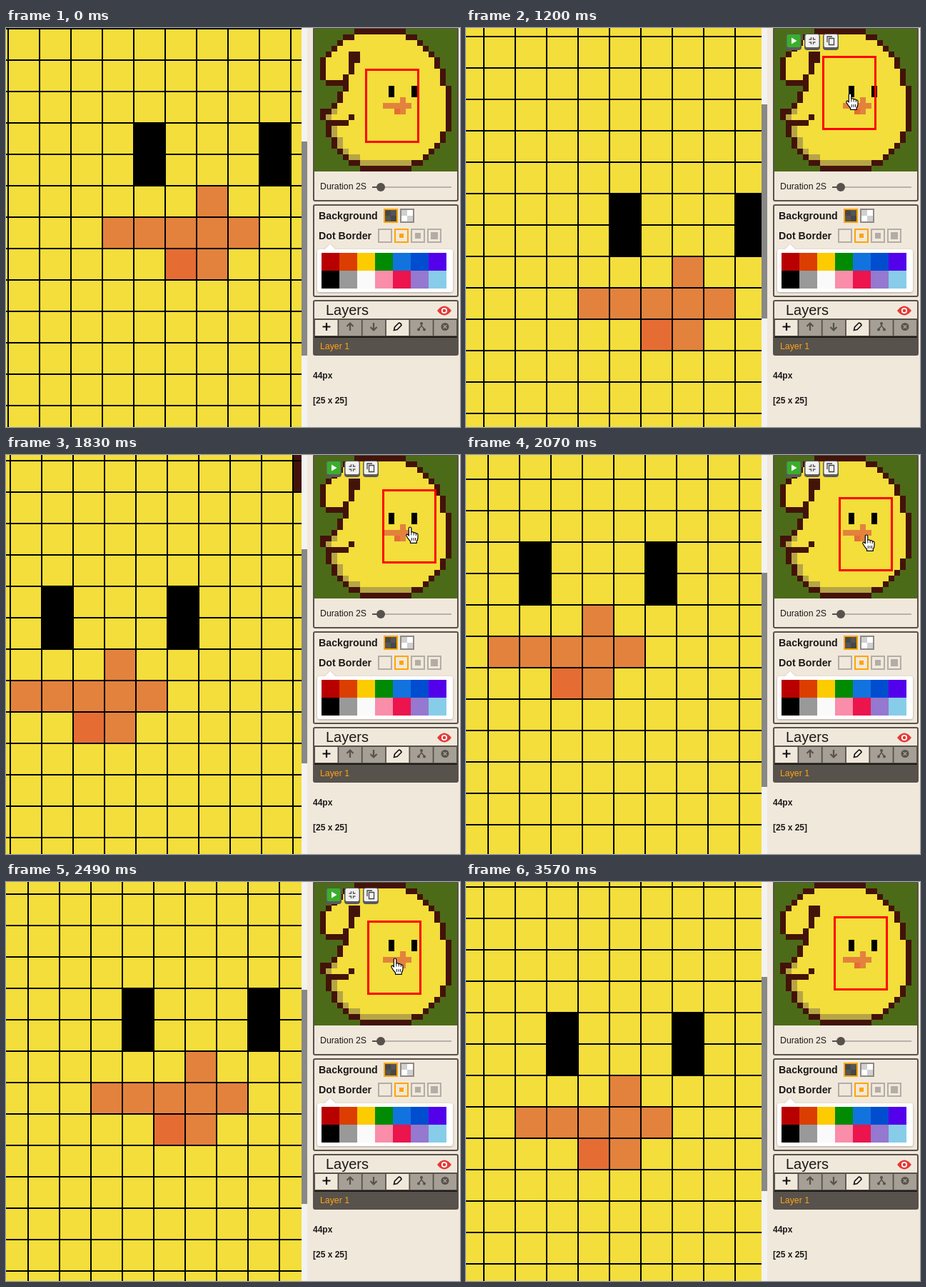
An HTML page for the animation above (3.69 s loop, 636x559 px).

```html
<!DOCTYPE html>
<html lang="en">
<head>
<meta charset="utf-8">
<title>Pixel editor</title>
<style>
  html, body { margin: 0; width: 100%; height: 100%; overflow: hidden; background: #f1e8dc; }
  #stage { display: block; width: 636px; height: 559px; }
  text { font-family: "Liberation Sans", Arial, sans-serif; fill: #1b1917; }
  .bold { font-weight: bold; }
</style>
</head>
<body>
<svg id="stage" viewBox="0 0 636 559" xmlns="http://www.w3.org/2000/svg">
  <defs>
    <g id="art" shape-rendering="crispEdges"></g>
    <filter id="soft" x="-10%" y="-20%" width="120%" height="150%">
      <feDropShadow dx="0" dy="1" stdDeviation="1.5" flood-opacity=".3"/>
    </filter>
  </defs>
  <rect width="636" height="559" fill="#f1e8dc"/>

  <!-- zoomed canvas -->
  <svg width="414" height="559">
    <g id="canvas">
      <use href="#art" transform="scale(44)"/>
      <path id="lines" stroke="#000" stroke-width="2" shape-rendering="crispEdges"/>
    </g>
  </svg>
  <rect x="414" width="8" height="559" fill="#f3f2f0"/>
  <rect id="thumb" x="414" width="8" height="300" fill="#888"/>

  <!-- preview -->
  <g fill="#f1e8dc" stroke="#57524b" stroke-width="2">
    <rect x="431" y="0" width="202" height="242" rx="2"/>
    <rect x="431" y="248" width="202" height="128" rx="2"/>
    <rect x="431" y="382" width="202" height="76" rx="2"/>
  </g>
  <use href="#art" transform="translate(432 1) scale(8)"/>
  <rect id="view" width="73" height="101" fill="none" stroke="#f00" stroke-width="3"/>
  <g id="tools">
    <g id="keys"></g>
    <path d="M456 13.5v9l7.5-4.5z" fill="#fff"/>
    <path d="M480.500 16h3v-3M489.500 16h-3v-3M480.500 20h3v3M489.500 20h-3v3" fill="none" stroke="#555" stroke-width="1.300"/>
    <path d="M506 20v-8h7M508.500 14.500h7v9h-7z" fill="none" stroke="#444" stroke-width="1.300"/>
  </g>
  <text x="440" y="226" font-size="12.3">Duration 2S</text>
  <path d="M513 223h111" stroke="#b8b1a8" stroke-width="2"/>
  <path d="M513 223h12" stroke="#57524b" stroke-width="2"/>
  <circle cx="525" cy="223" r="6" fill="#57524b"/>

  <!-- settings -->
  <text class="bold" x="438" y="268" font-size="14.2">Background</text>
  <text class="bold" x="438" y="296" font-size="14.2">Dot Border</text>
  <g id="options" shape-rendering="crispEdges"></g>
  <g filter="url(#soft)" fill="#fff">
    <rect x="436" y="310" width="190" height="60" rx="4"/>
    <path d="M446 311l8-8 8 8z"/>
  </g>
  <g id="palette" shape-rendering="crispEdges"></g>

  <!-- layers -->
  <text x="448" y="402" font-size="20">Layers</text>
  <path d="M604 396q10-13 20 0q-10 13-20 0z" fill="#e53935"/>
  <circle cx="614" cy="396" r="3.200" fill="#e53935" stroke="#fff" stroke-width="1.800"/>
  <rect x="432" y="407" width="200" height="50" fill="#57524b"/>
  <g id="actions"></g>
  <path d="M432 433h200" stroke="#1e1c19" stroke-width="2"/>
  <g fill="none" stroke="#57524b" stroke-width="2.200">
    <path d="M449 413v11M443.500 418.500h11" stroke="#111"/>
    <path d="M482 424v-10M477.500 418l4.500-4.500 4.500 4.500"/>
    <path d="M515 413v10M510.500 419l4.500 4.500 4.500-4.500"/>
    <path d="M543.500 423.500l1-4.500 6-6q3 .5 3.500 3.500l-6 6z" stroke="#111" stroke-width="1.600"/>
    <path d="M582 414v4M582 417l-4 5M582 417l4 5" stroke-width="1.500"/>
    <path d="M612.700 416.200l4.600 4.600M617.300 416.200l-4.600 4.600" stroke="#a59f96" stroke-width="1.500"/>
  </g>
  <g fill="#57524b">
    <circle cx="582" cy="414" r="2"/><circle cx="578" cy="422.500" r="2"/><circle cx="586" cy="422.500" r="2"/>
    <circle cx="615" cy="418.500" r="5.500"/>
  </g>
  <path d="M612.700 416.200l4.600 4.600M617.300 416.200l-4.600 4.600" stroke="#a59f96" stroke-width="1.500"/>
  <text x="440" y="450" font-size="12.3" style="fill:#ffa11a">Layer 1</text>
  <text class="bold" x="430" y="491" font-size="12">44px</text>
  <text class="bold" x="430" y="526" font-size="12">[25 x 25]</text>

  <g id="cursor">
    <path d="M4.300 13V2.800Q4.300 1 6 1T7.800 2.800V8.200Q10.500 7 11.200 9Q13.500 8 14.300 10Q17 9.300 17 12V16Q17 18.500 15.300 20.500V23.300H6.500V21Q3.500 18 1 13.500Q.3 11.300 2.200 11.200Q3.300 11.500 4.300 13Z"
      fill="#fff" stroke="#000" stroke-width="1.200" stroke-linejoin="round"/>
    <path d="M7.800 8.200v4.300M11.200 9v3.500M14.300 10v3M8.300 16v4M11 16v4M13.500 16v4" stroke="#000" stroke-width=".9"/>
  </g>
</svg>
<script>
const $ = id => document.getElementById(id);
const SIZE = 25, CELL = 44, DOT = 8;

function box(parent, x, y, w, h, fill, extra = {}) {
  const el = document.createElementNS("http://www.w3.org/2000/svg", "rect");
  for (const [k, v] of Object.entries({ x, y, width: w, height: h, fill, ...extra })) el.setAttribute(k, v);
  $(parent).append(el);
}

// Walks cell by cell along compass steps such as "e8 se n2".
function walk(x, y, steps) {
  const cells = [[x, y]];
  for (const step of steps.split(" ").filter(Boolean)) {
    const [, dir, count] = step.match(/([a-z]+)(\d*)/);
    for (let i = 0; i < (+count || 1); i++) {
      x += dir.includes("e") - dir.includes("w");
      y += dir.includes("s") - dir.includes("n");
      cells.push([x, y]);
    }
  }
  return cells;
}
const paint = (color, ...path) => walk(...path).forEach(([x, y]) => box("art", x, y, 1, 1, color));

function drawChick() {
  const brown = "#43130a", khaki = "#b6a546", beak = "#e3823d";
  const outline = [7, 0, "e8 se e se4 s se s2 se s7 sw s sw4 w sw w8 nw w nw3 n nw n2 nw n e ne2 n ne n w3 nw n3 ne4 e"];
  const edge = walk(...outline);
  box("art", 0, 0, SIZE, SIZE, "#4c6b18");
  for (let row = 0; row < SIZE; row++) {
    const xs = edge.filter(c => c[1] === row).map(c => c[0]);
    const left = Math.min(...xs);
    box("art", left, row, Math.max(...xs) - left + 1, 1, "#f3de3b");
  }
  paint(brown, ...outline);
  paint(brown, 7, 5, "n w s3 sw");
  paint(brown, 3, 16, "e2 ne");
  paint(khaki, 3, 14, "sw");
  paint(khaki, 3, 17, "s se s se2 e se e8");
  paint("#000", 13, 10, "s");
  paint("#000", 17, 10, "s");
  paint(beak, 12, 13, "e4");
  paint(beak, 15, 12, "s2");
  paint("#e56d34", 14, 14, "");
}

function drawPanels() {
  let d = "";
  for (let i = 0; i <= SIZE; i++) d += `M${i * CELL} 0V${SIZE * CELL}M0 ${i * CELL}H${SIZE * CELL}`;
  $("lines").setAttribute("d", d);

  ["#3aae2c", "#f1f1f1", "#f1f1f1"].forEach((fill, i) => {
    box("keys", 448 + 26 * i, 8, 22, 23, "#5a5a5a", { rx: 4 });
    box("keys", 449.5 + 26 * i, 9, 19, 18, fill, { rx: 2 });
  });

  const frame = (x, y, color, fill = "none") =>
    box("options", x + 1, y + 1, 18, 18, fill, { stroke: color, "stroke-width": 2 });
  [["#ffa500", "#555", "#484848"], ["#8f8a84", "#fff", "#d0d0d0"]].forEach(([line, a, b], i) => {
    const x = 529 + 23 * i;
    frame(x, 253, line, a);
    box("options", x + 2, 255, 8, 8, b);
    box("options", x + 10, 263, 8, 8, b);
  });
  [0, 6, 8, 10].forEach((s, i) => {
    const x = 521 + 23 * i, color = i === 1 ? "#ffa500" : "#b3ada6";
    frame(x, 281, color);
    box("options", x + 10 - s / 2, 291 - s / 2, s, s, color);
  });

  const colors = "b80000 db3e00 fccb00 008b02 1273de 004dcf 5300eb 000000 999999 fafafa fa8da9 eb144c 9578cf 87cde9";
  colors.split(" ").forEach((c, i) =>
    box("palette", 442 + 25 * (i % 7), 315 + 25 * Math.floor(i / 7), 25, 25, "#" + c));

  for (let i = 0; i < 6; i++)
    box("actions", 433 + 33.3 * i, 409, 31.5, 22, i % 3 ? "#a59f96" : "#f1e8dc");
}

// Keys are [ms, x, y].
const scrollKeys = [
  [900, 393, 307], [1070, 363, 258], [1200, 371, 208], [1400, 437, 182], [1560, 503, 208],
  [1760, 521, 240], [1950, 518, 286], [2070, 497, 318], [2270, 447, 334], [2490, 409, 291],
  [2550, 409, 291], [2700, 427, 268], [2850, 453, 263], [2910, 459, 257]
];
const enterKeys = [[270, 584, 123], [400, 562, 116], [520, 547, 112], [630, 542, 110]];
const leaveKeys = [[3060, 554, 101], [3200, 564, 99], [3350, 590, 95], [3480, 618, 92], [3560, 640, 90]];

// Smooth curve through the keys, held still at both ends.
function along(keys, t) {
  const last = keys.length - 1;
  if (t <= keys[0][0]) return keys[0].slice(1);
  if (t >= keys[last][0]) return keys[last].slice(1);
  const i = keys.findIndex(k => k[0] > t) - 1;
  const a = keys[i], b = keys[i + 1], span = b[0] - a[0], u = (t - a[0]) / span;
  const slope = (j, n) => j === 0 || j === last ? 0
    : (keys[j + 1][n] - keys[j - 1][n]) / (keys[j + 1][0] - keys[j - 1][0]);
  return [1, 2].map(n => a[n] === b[n] ? a[n] :
    (1 + 2 * u) * (1 - u) ** 2 * a[n] + u * u * (3 - 2 * u) * b[n] +
    span * u * (1 - u) * ((1 - u) * slope(i, n) - u * slope(i + 1, n)));
}

const move = (id, x, y) => $(id).setAttribute("transform", `translate(${x} ${y})`);

function render(ms) {
  const t = Math.floor(ms / 30) * 30;
  const [sx, sy] = along(scrollKeys, t).map(Math.round);
  const left = Math.round(432 + sx * DOT / CELL), top = Math.round(1 + sy * DOT / CELL);
  move("canvas", -sx, -sy);
  move("view", left + 1.5, top + 1.5);
  $("thumb").setAttribute("y", Math.round(sy * 0.525 - 2));

  const [cx, cy] = t < 900 ? along(enterKeys, t) : t < 3060 ? [left + 39, top + 53] : along(leaveKeys, t);
  move("cursor", Math.round(cx) - 6, Math.round(cy) - 1);
  const inside = t >= 270 && cx < 632;
  $("tools").style.display = inside ? "" : "none";
  $("cursor").style.display = t >= 270 && t < 3570 ? "" : "none";
}

drawChick();
drawPanels();
const start = performance.now();
function tick() {
  render((performance.now() - start) % 3690);
  requestAnimationFrame(tick);
}
tick();
</script>
</body>
</html>
```
